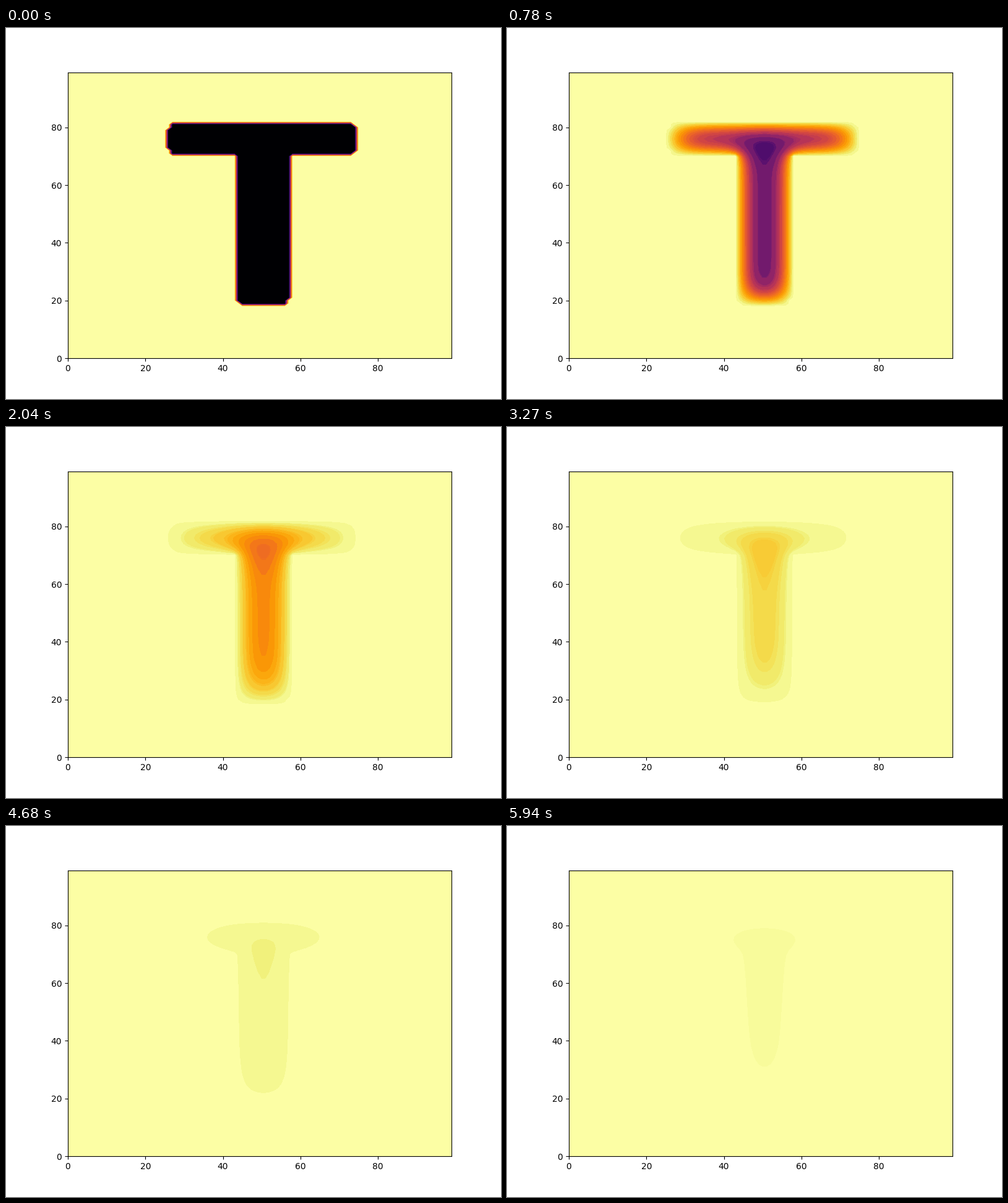
These frames come from a looping animation (800 by 600 pixels, 8 s). A matplotlib script:

```python
import numpy as np
import matplotlib.pyplot as plt
from matplotlib.animation import FuncAnimation

N = 100                    # grid nodes per side
AX_W, AX_H = 620, 462      # axes size in pixels
X0, X1, Y0, Y1 = 150, 480, 75, 390   # pixel window around the letter
LOOP, INTERVAL, STEP = 8000, 20, 30  # ms
RATE, SUBSTEPS, LAST = 0.531, 3, 198
BANDS = 255


def letter_mask():
    """Grid nodes inside the letter, with its slightly uneven corners."""
    m = np.zeros((N, N), bool)
    m[71:82, 27:74] = True
    m[73:80, 26] = True
    m[72:81, 74] = True
    m[19:71, 45:57] = True
    m[20:71, 44] = True
    m[21:71, 57] = True
    return m


def diffuse(mask):
    """Cold letter warming up from surroundings held at 1."""
    cold = mask.astype(float)
    fields = [cold]
    r = RATE / SUBSTEPS
    for _ in range(LAST):
        for _ in range(SUBSTEPS):
            lap = -4 * cold
            lap[1:-1, 1:-1] += (cold[:-2, 1:-1] + cold[2:, 1:-1]
                                + cold[1:-1, :-2] + cold[1:-1, 2:])
            cold = np.where(mask, cold + r * lap, 0)
        fields.append(cold)
    return fields


fields = diffuse(letter_mask())

# Pixel centres of the window in grid units
gx = (np.arange(X0, X1) + 0.5) * (N - 1) / AX_W
gy = (np.arange(Y0, Y1) + 0.5) * (N - 1) / AX_H
ix, iy = gx.astype(int), gy.astype(int)
fx, fy = np.meshgrid(gx - ix, gy - iy)
corner = np.ix_(iy, ix)
right = np.ix_(iy, ix + 1)
up = np.ix_(iy + 1, ix)
far = np.ix_(iy + 1, ix + 1)
lower_left = fx + fy <= 1
lower_right = fx >= fy


def sample(w):
    """Linear in triangles, each cell split along its flatter diagonal."""
    a, b, c, d = w[corner], w[right], w[up], w[far]
    falling = np.where(lower_left,
                       a + (b - a) * fx + (c - a) * fy,
                       d + (c - d) * (1 - fx) + (b - d) * (1 - fy))
    rising = np.where(lower_right,
                      a + (b - a) * fx + (d - b) * fy,
                      a + (c - a) * fy + (d - c) * fx)
    return np.where(abs(b - c) < abs(a - d), falling, rising)


mids = (np.arange(BANDS) + 0.5) / BANDS
colors = plt.get_cmap("inferno")(mids, bytes=True)[:, :3].astype(int)
keys = (colors[:, 0] >> 5) * 128 + (colors[:, 1] >> 4) * 8 + (colors[:, 2] >> 5)
group = np.unique(keys, return_inverse=True)[1].ravel()
OUTSIDE = AX_W * AX_H - (X1 - X0) * (Y1 - Y0)


def merged_palette(band):
    """Bands of close colour share their mean, weighted by area."""
    area = np.bincount(band.ravel(), minlength=BANDS).astype(float)
    area[-1] += OUTSIDE
    area += 1e-9
    total = np.bincount(group, area)
    mean = [np.bincount(group, area * ch) / total for ch in colors.T]
    return np.rint(np.stack(mean, axis=1)).astype(np.uint8)[group]


def pose(frame):
    n = (frame * INTERVAL + INTERVAL // 2) // STEP
    if n < 165:
        return n
    if n < 195:
        return 165
    return 195 if n < LAST else LAST


def render(n):
    u = 1 - sample(fields[n])
    band = np.clip((u * BANDS).astype(int), 0, BANDS - 1)
    palette = merged_palette(band)
    return palette[band], palette[-1] / 255


fig, ax = plt.subplots(figsize=(8, 6), dpi=100)
fig.subplots_adjust(left=0.125, right=0.9, bottom=0.11, top=0.88)
pixels, background = render(0)
sx, sy = (N - 1) / AX_W, (N - 1) / AX_H
image = ax.imshow(pixels, origin="lower", aspect="auto", interpolation="nearest",
                  extent=(X0 * sx, X1 * sx, Y0 * sy, Y1 * sy))
ax.set(xlim=(0, N - 1), ylim=(0, N - 1),
       xticks=range(0, N, 20), yticks=range(0, N, 20))
shown = [None]


def update(frame):
    n = pose(frame)
    if n != shown[0]:
        pixels, background = render(n)
        image.set_data(pixels)
        ax.set_facecolor(background)
        shown[0] = n
    return (image,)


def reset():
    shown[0] = None
    return update(0)


anim = FuncAnimation(fig, update, init_func=reset, frames=LOOP // INTERVAL,
                     interval=INTERVAL, repeat=True, repeat_delay=0, blit=False)
plt.show()
```
